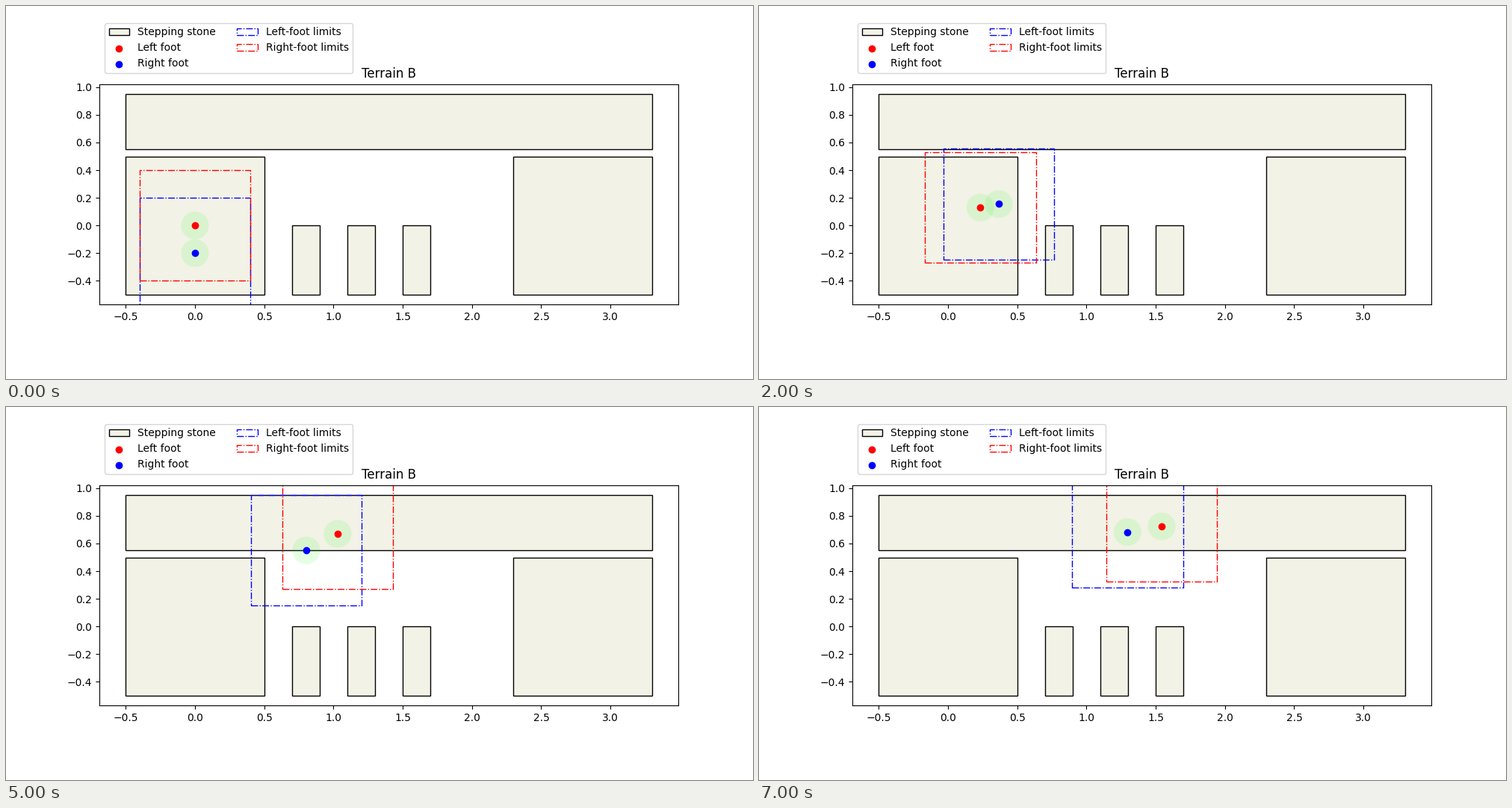
These frames come from a looping animation (1000x500 px, 8000 ms). A matplotlib script:

```python
import matplotlib.pyplot as plt
from matplotlib.animation import FuncAnimation
from matplotlib.patches import Circle, Rectangle

FRAMES = 8
STEP_SPAN = 0.8
FOOT_RADIUS = 0.1
MARGIN = 0.05

# Terrain layout: two square platforms, pillars between them, a beam above
LEFT, RIGHT, FLOOR = -0.5, 3.3, -0.5
PLATFORM = 1.0
PILLARS, PILLAR_WIDTH = 3, 0.2
BEAM_HEIGHT = 0.4

# Footholds in walking order; the feet alternate, left foot first
FOOTHOLDS = [
    (0, 0), (0, -0.2), (0.2345, 0.13), (0.367, 0.155), (0.4965, 0.421),
    (0.804, 0.55), (1.0305, 0.67), (1.297, 0.683), (1.543, 0.724),
]


def add_stone(ax, x, y, width, height, label=None):
    ax.add_patch(Rectangle((x, y), width, height, facecolor=(0.95, 0.95, 0.9),
                           edgecolor="k", label=label))


def draw_terrain(ax):
    platform_top = FLOOR + PLATFORM
    add_stone(ax, LEFT, FLOOR, PLATFORM, PLATFORM, "Stepping stone")
    add_stone(ax, RIGHT - PLATFORM, FLOOR, PLATFORM, PLATFORM)
    for i in range(PILLARS):
        x = LEFT + PLATFORM + PILLAR_WIDTH * (2 * i + 1)
        add_stone(ax, x, FLOOR, PILLAR_WIDTH, PLATFORM / 2)
    beam_bottom = platform_top + MARGIN
    add_stone(ax, LEFT, beam_bottom, RIGHT - LEFT, BEAM_HEIGHT)

    # Pad each axis by a twentieth of its extent
    beam_top = beam_bottom + BEAM_HEIGHT
    pad_x, pad_y = MARGIN * (RIGHT - LEFT), MARGIN * (beam_top - FLOOR)
    ax.set_xlim(LEFT - pad_x, RIGHT + pad_x)
    ax.set_ylim(FLOOR - pad_y, beam_top + pad_y)
    ax.set_aspect("equal")
    ax.set_title("Terrain B")


class Foot:
    """A foot, its sole area and the limits it sets for the other foot."""

    def __init__(self, ax, color, name):
        self.dot = ax.scatter(0, 0, color=color, zorder=3, label=f"{name} foot")
        self.sole = ax.add_patch(Circle((0, 0), FOOT_RADIUS, facecolor="lime",
                                        edgecolor="none", alpha=0.1, zorder=2))
        self.color = color

    def add_limits(self, ax, label):
        self.limits = ax.add_patch(
            Rectangle((0, 0), STEP_SPAN, STEP_SPAN, facecolor="none",
                      edgecolor=self.color, linestyle="-.", label=label))

    def move(self, x, y):
        self.dot.set_offsets([(x, y)])
        self.sole.set_center((x, y))
        self.limits.set_xy((x - STEP_SPAN / 2, y - STEP_SPAN / 2))


fig, ax = plt.subplots(figsize=(10, 5), dpi=100)
draw_terrain(ax)
left, right = feet = Foot(ax, "r", "Left"), Foot(ax, "b", "Right")
right.add_limits(ax, "Left-foot limits")
left.add_limits(ax, "Right-foot limits")
ax.legend(loc="upper left", bbox_to_anchor=(0, 1.3), ncol=2)


def animate(frame):
    # The stance is always two consecutive footholds
    for i in (frame, frame + 1):
        feet[i % 2].move(*FOOTHOLDS[i])


anim = FuncAnimation(fig, animate, frames=FRAMES, interval=1000, repeat=True)
plt.show()
```
